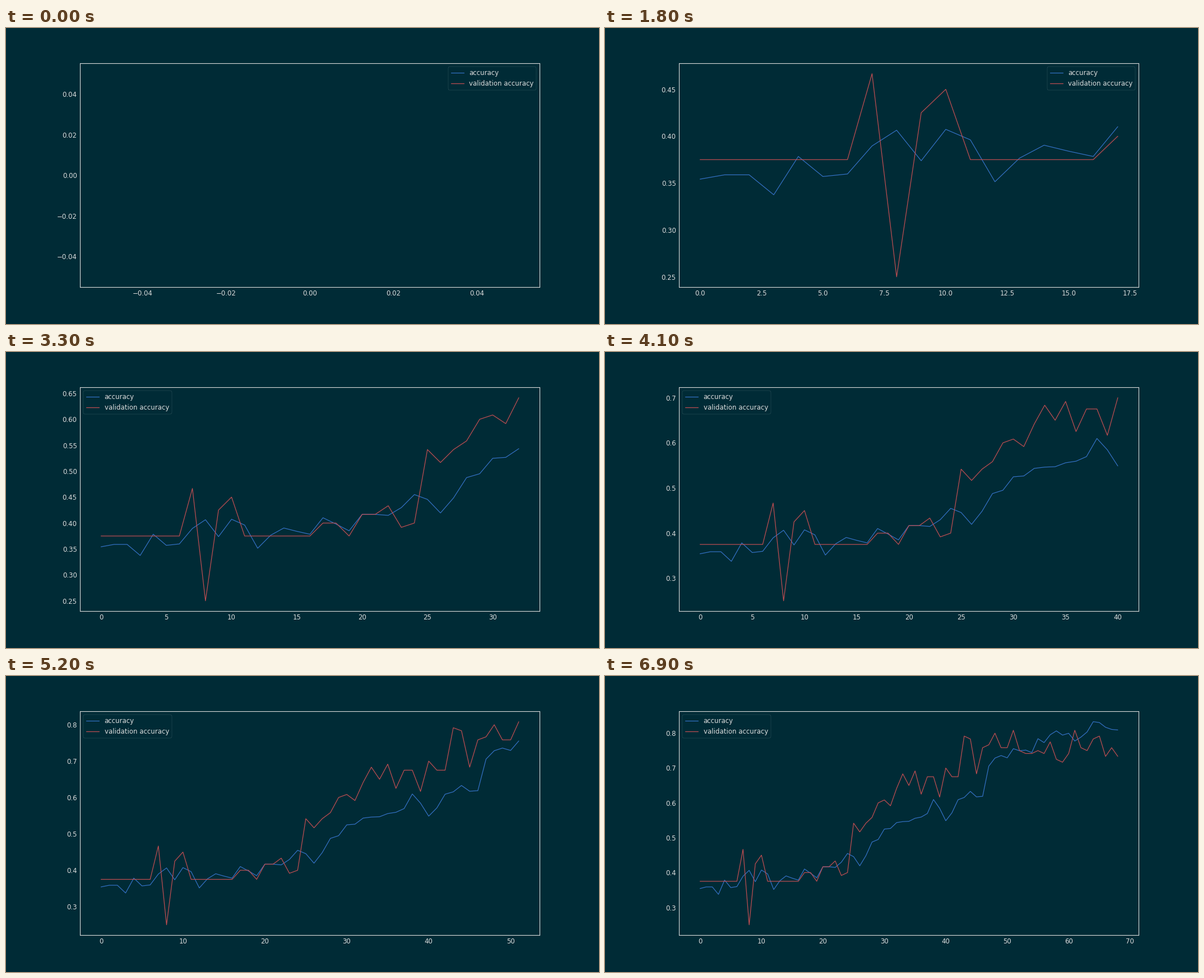
Write a matplotlib script that moves like this. It is 1058x529 px and loops after 7 s.

```python
import matplotlib.pyplot as plt
from matplotlib.animation import FuncAnimation

WIDTH, HEIGHT, DPI = 1058, 529, 72
FRAMES, INTERVAL = 70, 100
BACKGROUND, FOREGROUND = "#002b36", "#dbdbdb"
BLUE, RED = "#3572c6", "#c44e52"
FONT_SIZE = 11.7

plt.rcParams.update({
    "font.family": "DejaVu Sans",
    "font.size": FONT_SIZE,
    "figure.facecolor": BACKGROUND,
    "savefig.facecolor": BACKGROUND,
    "axes.facecolor": BACKGROUND,
    "axes.edgecolor": FOREGROUND,
    "axes.linewidth": 1.12,
    "text.color": FOREGROUND,
    "xtick.color": FOREGROUND,
    "ytick.color": FOREGROUND,
    "xtick.labelsize": FONT_SIZE,
    "ytick.labelsize": FONT_SIZE,
    "xtick.major.size": 0,
    "ytick.major.size": 0,
    "xtick.major.pad": 5.6,
    "ytick.major.pad": 5.6,
    "lines.linewidth": 1.2,
    "lines.solid_capstyle": "round",
    "legend.fontsize": FONT_SIZE,
    "legend.edgecolor": "0.8",
    "patch.linewidth": 0.16,
})

# Training accuracy per epoch
accuracy = [
    .3542, .3588, .3588, .3375, .3784, .3570, .3597, .3896, .4064, .3738,
    .4073, .3961, .3514, .3766, .3904, .3840, .3784, .4102, .3980, .3850,
    .4167, .4167, .4148, .4297, .4549, .4456, .4194, .4484, .4876, .4950,
    .5248, .5266, .5434, .5462, .5471, .5558, .5593, .5695, .6097, .5844,
    .5487, .5714, .6090, .6155, .6330, .6172, .6188, .7055, .7285, .7358,
    .7293, .7555, .7495, .7515, .7443, .7842, .7730, .7955, .8066, .7945,
    .7997, .7775, .7887, .8035, .8330, .8305, .8170, .8108, .8092,
]

# Correct answers out of 120 validation samples per epoch
correct = [45] * 7 + [56, 30, 51, 54] + [45] * 6 + [
    48, 48, 45, 50, 50, 52, 47, 48, 65, 62, 65, 67, 72, 73, 71, 77, 82, 78,
    83, 75, 81, 81, 74, 84, 81, 81, 95, 94, 82, 91, 92, 96, 91, 91, 97, 90,
    89, 89, 90, 89, 93, 87, 86, 89, 97, 91, 90, 94, 95, 88, 91, 88,
]
validation = [count / 120 for count in correct]

fig, ax = plt.subplots(figsize=(WIDTH / DPI, HEIGHT / DPI), dpi=DPI)
fig.subplots_adjust(left=0.125, right=0.9, bottom=0.125, top=0.88)


def draw(epochs):
    ax.clear()
    ax.plot(range(epochs), accuracy[:epochs], color=BLUE, label="accuracy")
    ax.plot(range(epochs), validation[:epochs], color=RED,
            label="validation accuracy")
    ax.legend(loc="best")
    return ax.lines


anim = FuncAnimation(fig, draw, frames=FRAMES, interval=INTERVAL,
                     init_func=lambda: draw(0), repeat=True, repeat_delay=0)
plt.show()
```
